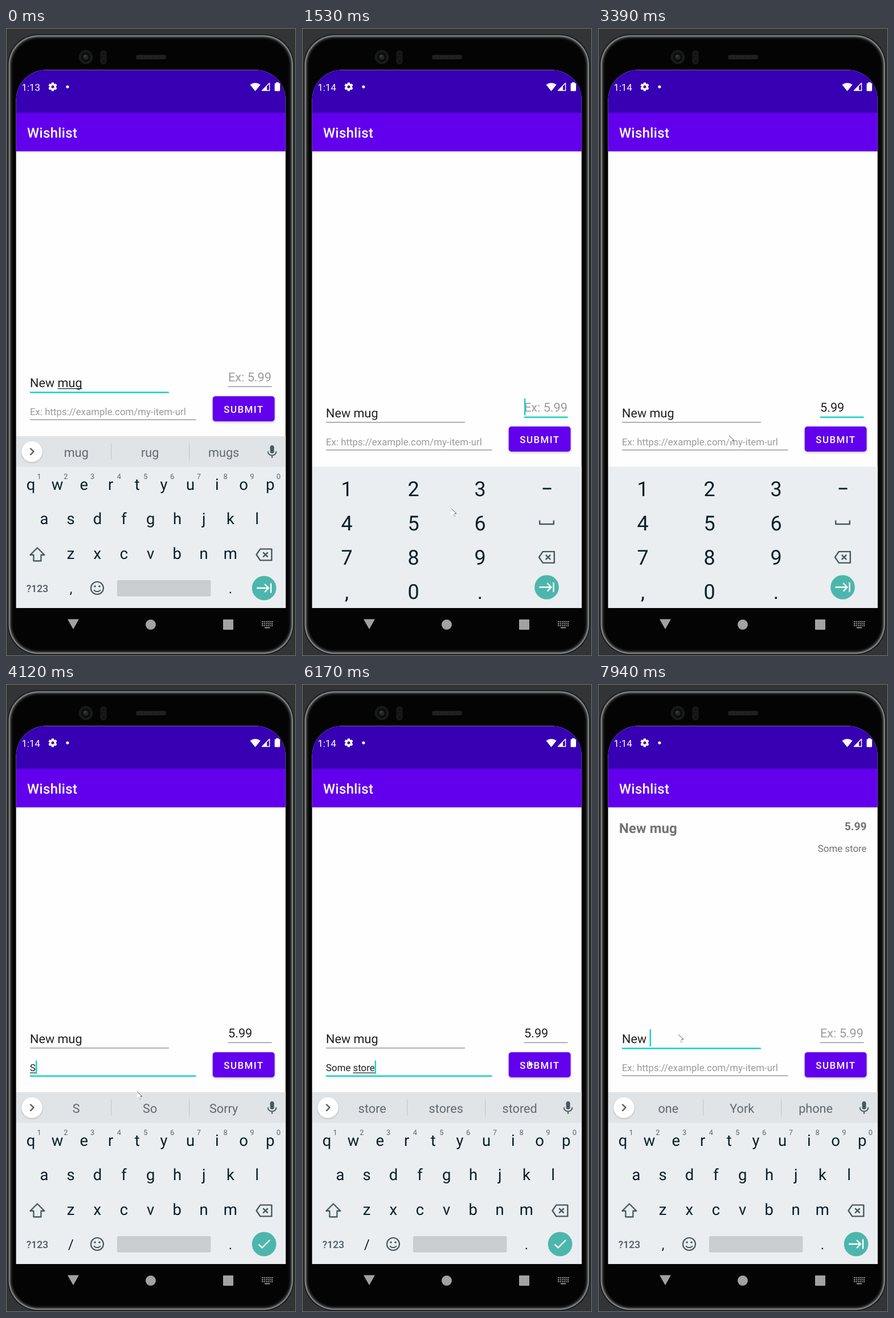
Recreate the animation shown at these times as an HTML page with a canvas. Size 509 px wide and 1100 px high, loop 8000 ms.

```html
<!DOCTYPE html>
<html lang="en">
<head>
<meta charset="utf-8">
<title>Wishlist</title>
<style>
html, body { margin: 0; width: 100%; height: 100%; overflow: hidden; background: #323436; }
canvas { display: block; width: 509px; height: 1100px; }
</style>
</head>
<body>
<canvas id="stage" width="509" height="1100"></canvas>
<script>
const c = document.getElementById('stage').getContext('2d');
const LOOP = 8000, SP = 1.2045;
const TEAL = '#10d6c4', INK = '#0b1e27', ICON = '#48585f', MUTED = '#5f696f', STRIP = '#e0e4e7';
const HINTS = { name: 'Name', price: 'Ex: 5.99', url: 'Ex: https://example.com/my-item-url' };

// Each step changes part of the state from its time on.
const steps = [
  [0, { clock: '1:13', name: 'New mug', price: '', url: '', focus: 'name', caret: false, word: true,
        pad: false, shift: 0, act: 'next', sug: 'mug rug mugs', item: false, mouse: null }],
  [400, { caret: true }],
  [540, { mouse: [443, 657] }],
  [670, { mouse: [450, 611] }],
  [950, { focus: 'price', word: false, pad: true }],
  [1090, { shift: 53 }],
  [1230, { mouse: [410, 680] }],
  [1370, { mouse: [340, 765], clock: '1:14' }],
  [1510, { mouse: [262, 842] }],
  [1650, { mouse: [230, 872] }],
  [1790, { caret: false }],
  [1930, { caret: true, price: '5' }],
  [2050, { mouse: [275, 918] }],
  [2190, { mouse: [320, 957] }],
  [2320, { price: '5.' }],
  [2460, { mouse: [321, 938] }],
  [2600, { price: '5.9' }],
  [2740, { mouse: [320, 928] }],
  [2870, { price: '5.99' }],
  [3010, { caret: false }],
  [3140, { mouse: [285, 835] }],
  [3280, { mouse: [230, 714] }],
  [3410, { focus: 'url', caret: true }],
  [3550, { pad: false, shift: 0, sug: '', act: 'done' }],
  [3970, { url: 'S', word: true }],
  [4120, { sug: 'S So Sorry' }],
  [4280, { url: 'So', sug: 'So Some Sorry' }],
  [4400, { url: 'Som', sug: 'Som Some Something' }],
  [4540, { url: 'Some', sug: 'Some Someone Something' }],
  [4680, { url: 'Some ', sug: 'of people things' }],
  [4810, { url: 'Some s', sug: 's so sort' }],
  [4940, { url: 'Some st', sug: 'st stuff still' }],
  [5060, { url: 'Some sto', sug: 'sto store stop' }],
  [5210, { url: 'Some store', sug: 'store stores stored' }],
  [5620, { mouse: [272, 701] }],
  [5760, { mouse: [338, 680] }],
  [5900, { mouse: [386, 664] }],
  [6030, { mouse: [398, 659] }],
  [6470, { item: true, name: '', price: '', url: '', word: false }],
  [6620, { sug: '' }],
  [6740, { mouse: [275, 636] }],
  [6880, { mouse: [141, 614] }],
  [7010, { focus: 'name' }],
  [7160, { act: 'next' }],
  [7440, { name: 'N', word: true, sug: 'N New No' }],
  [7600, { name: 'Ne', sug: 'Ne New Need' }],
  [7770, { name: 'New', sug: 'New News Newer' }],
  [7940, { name: 'New ', sug: 'one York phone' }]
];

function stateAt(t) {
  return Object.assign({}, ...steps.filter(s => s[0] <= t).map(s => s[1]));
}

function text(s, x, y, size, color, { weight = 400, align = 'left', gap = 0 } = {}) {
  c.font = `${weight} ${size}px Roboto, sans-serif`;
  c.textRendering = 'geometricPrecision';
  c.textAlign = align;
  c.letterSpacing = gap + 'px';
  c.fillStyle = color;
  c.fillText(s, x, y);
  const w = c.measureText(s).width;
  c.letterSpacing = '0px';
  return w;
}
const mid = (s, x, y, size, color, weight) => text(s, x, y, size, color, { weight, align: 'center' });

function rect(x, y, w, h, color, r = 0) {
  c.fillStyle = color;
  c.beginPath();
  c.roundRect(x, y, w, h, r);
  c.fill();
}
function disc(x, y, r, color) {
  c.fillStyle = color;
  c.beginPath();
  c.arc(x, y, r, 0, 7);
  c.fill();
}
function ring(x, y, r, color, w) {
  c.strokeStyle = color;
  c.lineWidth = w;
  c.beginPath();
  c.arc(x, y, r, 0, 7);
  c.stroke();
}
// Draws an SVG path around (x, y): filled without a width, stroked with one.
function path(d, x, y, color, w) {
  const p = new Path2D(d);
  c.save();
  c.translate(x, y);
  c.fillStyle = c.strokeStyle = color;
  c.lineWidth = w || 1;
  if (w) c.stroke(p); else c.fill(p);
  c.restore();
}
function shadow(blur, dy, alpha, draw) {
  c.save();
  c.shadowColor = `rgba(0,0,0,${alpha})`;
  c.shadowBlur = blur;
  c.shadowOffsetY = dy;
  draw();
  c.restore();
}

function phone() {
  rect(0, 0, 509, 1100, '#77797a');
  rect(1, 1, 507, 1098, '#323436');
  const layer = (inset, color) =>
    rect(3 + inset, 11 + inset, 502.5 - 2 * inset, 1087 - 2 * inset, color, 54 - inset);
  layer(0, '#141516');
  layer(1.5, '#7c7e80');
  // The metal rim fades into the black glass.
  for (let i = 0; i < 7; i++) {
    const v = 4 + 64 * (1 - i / 6) ** 2;
    layer(4 + i, `rgb(${v},${v},${v})`);
  }
  disc(140, 51, 12.5, '#191919');
  disc(140, 51, 8, '#0c0d0e');
  disc(140, 51, 4.5, '#22272a');
  disc(138.5, 49, 1.5, '#4a5255');
  rect(165, 39, 12, 25, '#141414', 6);
  ring(171, 44.5, 4, '#222', 1);
  ring(171, 57.5, 4, '#222', 1);
  rect(228, 47, 53, 8, '#1d1d1d', 3);
  for (let x = 231; x < 279; x += 4) rect(x, 48.5, 1, 5, '#2b2b2b');
}

function navBar() {
  const gray = '#a2a2a2';
  path('M-10-8.5H10L0 9Z', 118, 1044, gray);
  disc(254, 1045, 9, gray);
  rect(381, 1036, 18, 18, gray, 1);
  for (let row = 0; row < 3; row++)
    for (let i = 0; i < 6; i++) rect(449 + i * 3.4, 1039 + row * 3.4, 2, 2, gray);
  rect(454, 1049.5, 9, 1.8, gray);
}

function gear(x, y) {
  c.save();
  c.translate(x, y);
  for (let i = 0; i < 6; i++) {
    c.rotate(Math.PI / 3);
    rect(-2.2, -7.6, 4.4, 4, '#fff', 1);
  }
  c.restore();
  ring(x, y, 4.2, '#fff', 3.4);
}

function header(s) {
  rect(18, 73.5, 473, 76, '#3700b3');
  text(s.clock, 27.5, 110, 14 * SP, '#fff');
  gear(82, 103);
  disc(108, 103, 2.6, '#fff');
  path('M0 7.5L-9-3.5C-4-8 4-8 9-3.5Z', 437.5, 103, '#fff');
  path('M-6.5 6.5H6.5V-6.5Z', 456, 103, '#fff', 1.5);
  path('M-7 7H2V-2Z', 456, 103, '#fff');
  rect(471.5, 96.5, 9.5, 14, '#fff', 1.5);
  rect(474, 95, 4.5, 2, '#fff');
  shadow(3, 1, .2, () => rect(18, 148.5, 473, 67.5, '#6200ee'));
  text('Wishlist', 37, 192, 20 * SP, '#fff', { weight: 500, gap: .3 });
}

function field(s, key, x, right, line, base, sp, caretTop, caretH) {
  const size = sp * SP, value = s[key], on = s.focus === key;
  if (on) rect(x, line - .5, right - x, 2.4, TEAL);
  else rect(x, line - .5, right - x, 1.2, '#868686');
  const w = text(value || HINTS[key], x, base, size, value ? '#212121' : '#9b9b9b');
  if (!on) return;
  const start = value.lastIndexOf(' ') + 1;
  if (s.word && start < value.length) {
    const from = c.measureText(value.slice(0, start)).width;
    rect(x + from, base + 2.5, w - from, 1.3, '#212121');
  }
  if (s.caret) rect(x + (value ? w : 0), caretTop, 2.4, caretH, TEAL);
}

function form(s) {
  c.save();
  c.translate(0, s.shift);
  field(s, 'name', 42, 286, 637.5, 628.5, 18, 605, 30);
  field(s, 'price', 390, 466.5, 628, 619, 18, 596, 29.5);
  field(s, 'url', 42, 333.5, 686, 678, 14, 659.5, 23.5);
  shadow(4, 1.5, .25, () => rect(362.8, 645, 108.7, 44, '#6200ee', 4.8));
  text('SUBMIT', 382.2, 673.5, 14 * SP, '#fff', { weight: 500, gap: 1.5 });
  c.restore();
}

function listItem() {
  const gray = '#737373';
  text('New mug', 37, 261, 20 * SP, gray, { weight: 700 });
  text('5.99', 471.5, 256, 16 * SP, gray, { weight: 700, align: 'right' });
  text('Some store', 471.5, 294, 14 * SP, gray, { align: 'right' });
}

function backspace(x, y) {
  path('M-13.5 0L-6.8-9.9H13.3V9.9H-6.8Z', x, y, ICON, 2.4);
  path('M-4.2-4.2L4.2 4.2M4.2-4.2L-4.2 4.2', x + 2.4, y, ICON, 2.4);
}

function action(x, y, kind) {
  disc(x, y, 21.3, '#4db6ac');
  if (kind === 'next') path('M-13 0H8M1-7L8 0L1 7M12-8.5V8.5', x, y, '#fff', 2.4);
  else path('M-9.5 .5L-3.5 6.5L10-7', x, y, '#fff', 2.4);
}

function numberPad(s) {
  rect(18, 768, 473, 248, '#eaeef1');
  ['123', '456', '789', ',0.'].forEach((row, r) =>
    [...row].forEach((k, i) => mid(k, 78.5 + i * 117, 820 + r * 60, 36, INK)));
  rect(422.5, 805.5, 15, 2.8, INK);
  path('M-12.3-4.5V2H12.3V-4.5', 429.5, 867, ICON, 2.4);
  backspace(429.5, 927);
  action(429.5, 979.5, s.act);
}

function toolbar() {
  rect(100, 733, 19, 19, ICON);
  disc(178, 742, 10.5, ICON);
  disc(185, 748, 3.6, STRIP);
  for (const [x, y] of [[-6, 0], [-3, -5], [3, -5], [6, 0]]) disc(178 + x, 741 + y, 1.7, STRIP);
  path('M-3.5-9H3.5M-3.5 9H3.5M0-9V9', 246, 742, ICON, 2);
  path('M-11 0L-6-4V4ZM11 0L6-4V4Z', 246, 742, ICON);
  path('M1 9H-9V-9H9V2', 315, 742, ICON, 2.2);
  path('M-3-3L10 3V10H2L-4 4L0 4Z', 315, 742, ICON);
  rect(357, 728, 1, 28, '#c3c8cb');
  for (const x of [392.5, 400, 407.5]) disc(x, 742, 2.5, ICON);
}

function topStrip(s) {
  rect(18, 715, 473, 53.5, STRIP);
  shadow(3, 1, .22, () => disc(45.5, 742, 18.3, '#fff'));
  path(s.sug ? 'M-3-6L3 0L-3 6' : 'M3-6L-3 0L3 6', 45.5, 742, ICON, 2.3);
  if (s.sug) {
    s.sug.split(' ').forEach((w, i) => mid(w, 123.3 + i * 129.4, 750.5, 18 * SP, MUTED));
    rect(184, 728, 1.2, 28, '#c3c8cb');
    rect(321, 728, 1.2, 28, '#c3c8cb');
  } else toolbar();
  rect(463.5, 731, 7, 14, ICON, 3.5);
  path('M-7.3-.5C-7.3 9 7.3 9 7.3-.5M0 6.5V11', 467, 742, ICON, 2);
}

function letters(s) {
  rect(18, 768, 473, 248, '#eaeef1');
  topStrip(s);
  const STEP = 46.7;
  [['qwertyuiop', 43.5], ['asdfghjkl', 67], ['zxcvbnm', 113.5]].forEach(([row, x], r) =>
    [...row].forEach((k, i) => {
      mid(k, x + i * STEP, 808.5 + r * 60.5, 27.5, INK);
      if (!r) mid((i + 1) % 10, x + 14.7 + i * STEP, 790, 13, MUTED);
    }));
  path('M0-11.5L12.5 1H6.5V11.5H-6.5V1H-12.5Z', 55, 922, ICON, 2.3);
  backspace(453, 922.5);
  mid('?123', 55, 987.5, 17.5, ICON, 500);
  mid(s.act === 'next' ? ',' : '/', 114, 990, 24, INK);
  ring(160, 981, 11, ICON, 2.2);
  disc(156, 978, 1.8, ICON);
  disc(164, 978, 1.8, ICON);
  path('M-5.6 2.8C-3.6 7.2 3.6 7.2 5.6 2.8', 160, 981, ICON, 2);
  rect(195, 967, 164.5, 28.5, '#c9cdd0', 3);
  mid('.', 394, 990, 24, INK);
  action(453, 981, s.act);
}

function pointer([x, y]) {
  path('M0 0V11.5L2.7 9L5 14L7 13L4.8 8.5L9 8.3Z', x, y, '#fff');
  path('M0 0L9 8.3L5.5 8.5', x, y, '#555', 1);
  path('M3 9.5L5 14L7 13L5.2 9', x, y, 'rgba(90,90,90,.55)', .8);
}

function draw(t) {
  const s = stateAt(t);
  phone();
  c.save();
  c.beginPath();
  c.roundRect(17.7, 73.5, 473, 942.5, [52, 52, 0, 0]);
  c.clip();
  rect(17, 73, 474, 943, '#fefefe');
  header(s);
  if (s.item) listItem();
  form(s);
  if (s.pad) numberPad(s); else letters(s);
  c.restore();
  navBar();
  if (s.mouse) pointer(s.mouse);
}

c.lineJoin = 'round';
const start = performance.now();
function tick() {
  draw((performance.now() - start) % LOOP);
  requestAnimationFrame(tick);
}
tick();
</script>
</body>
</html>
```
